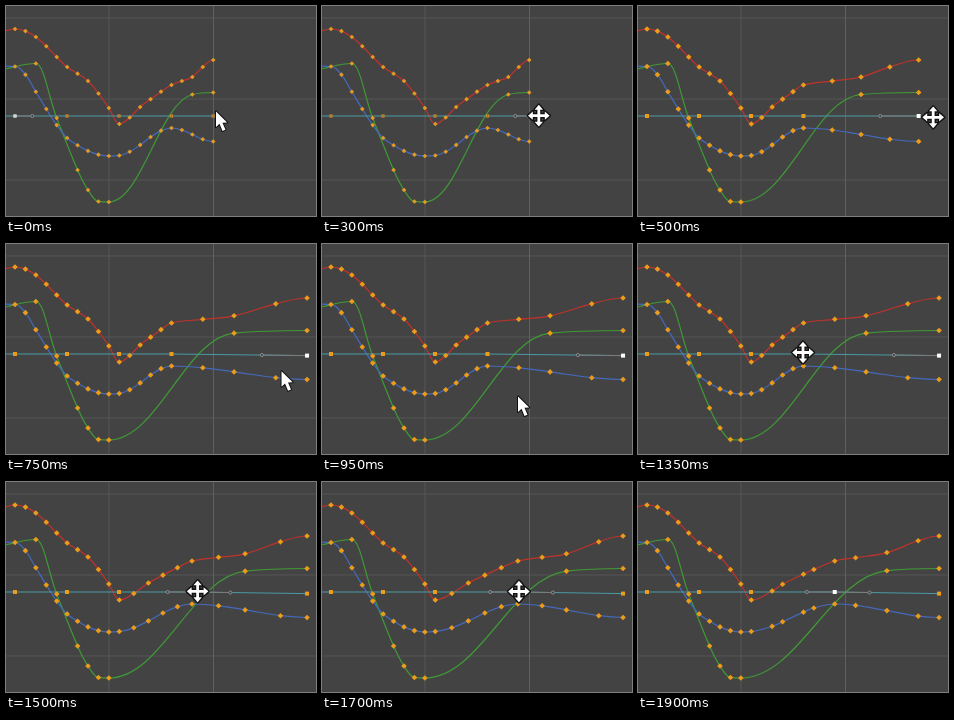
Write an HTML page with a canvas that moves like this. It is 310 px wide and 210 px high and loops after 2000 ms.

```html
<!DOCTYPE html>
<html lang="en">
<head>
<meta charset="utf-8">
<title>Animation curve retiming</title>
<style>
html, body { margin: 0; width: 100%; height: 100%; overflow: hidden; background: #434344; }
canvas { display: block; width: 310px; height: 210px; }
</style>
</head>
<body>
<canvas id="stage" width="310" height="210"></canvas>
<script>
const ctx = document.getElementById('stage').getContext('2d');
const LOOP = 2000, STEP = 50;
const DRAG_END = 300, SNAP_END = 700, DRAG_MID = 1350, SNAP_MID = 1850;
const HANDLE = 0.39;

const lerp = (a, b, p) => a + (b - a) * p;
const ramp = (t, a, b) => Math.min(1, Math.max(0, (t - a) / (b - a)));
const smooth = p => p * p * (3 - 2 * p);
const easeOut = (p, n) => 1 - (1 - p) ** n;
const px = frame => 9 + frame * 10.43;
const toFrame = x => (x - 9) / 10.43;

// Auto tangents: flat at extremes, handles never past a neighbour
function slopes(p) {
  return p.map(([x, y], i) => {
    if (!i || i === p.length - 1) return 0;
    const [x0, y0] = p[i - 1], [x1, y1] = p[i + 1];
    const a = (y - y0) / (x - x0), b = (y1 - y) / (x1 - x);
    if (a * b <= 0) return 0;
    const m = (y1 - y0) / (x1 - x0);
    return Math.sign(m) * Math.min(Math.abs(m), Math.abs(a) / HANDLE, Math.abs(b) / HANDLE);
  });
}

function valueAt(keys, x) {
  const i = keys.findIndex(k => k[0] >= x);
  if (i < 0) return keys[keys.length - 1][1];
  if (i === 0) return keys[0][1];
  const m = slopes(keys), [x0, y0] = keys[i - 1], [x1, y1] = keys[i];
  const d = x1 - x0, u = (x - x0) / d, v = 1 - u;
  return lerp(y0, y1, smooth(u)) + d * u * v * (v * m[i - 1] - u * m[i]);
}

// Fill in a key on every frame from a few anchors
function bake(anchors) {
  const keys = [anchors[0]];
  for (let k = 0; k <= 19; k++) keys.push([k, valueAt(anchors, k)]);
  return keys;
}

const curves = [
  { color: '#3f9a35', keys: [[-2, 64], [2, 57.5], [4, 112], [6, 164], [7, 184], [8, 195.5], [9, 196], [17, 88.5], [19, 86.5]] },
  { color: '#4469bc', keys: bake([[-2, 60], [0, 60.5], [3, 103], [5, 132], [9, 150], [10, 149.5], [15, 122], [16, 124], [19, 135.5]]) },
  { color: '#c0322a', keys: bake([[-2, 27], [0, 23], [2, 31], [5, 61], [7, 75], [9, 102], [10, 118], [12, 101], [15, 79], [17, 71], [19, 54]]) }
];

function getState(t) {
  return {
    end: t >= SNAP_END ? 28 : toFrame(lerp(207.2, 299, ramp(t, DRAG_END, 550))),
    mid: t >= SNAP_MID ? 18 : toFrame(lerp(165.5, 196.7, easeOut(ramp(t, DRAG_MID, SNAP_MID), 3))),
    endY: 110 + 1.6 * ramp(t, 500, 550)
  };
}

// Keys move to whole frames and stay on the curve
const snapKeys = keys => keys.map(([k]) => [Math.round(k), valueAt(keys, Math.round(k))]);

function stretchEnd(keys, end) {
  return keys.map(([k, y]) => [k > 15 ? lerp(15, end, (k - 15) / 4) : k, y]);
}

function shiftMid(keys, mid) {
  return keys.map(([k, y]) => {
    if (k <= 10) return [k, y];
    return [k <= 15 ? lerp(10, mid, (k - 10) / 5) : lerp(mid, 28, (k - 15) / 13), y];
  });
}

function retime(keys, t) {
  if (t < SNAP_END) return stretchEnd(keys, getState(t).end);
  const wide = snapKeys(stretchEnd(keys, getState(SNAP_END - STEP).end));
  if (t < SNAP_MID) return shiftMid(wide, getState(t).mid);
  return snapKeys(shiftMid(wide, getState(SNAP_MID - STEP).mid));
}

function drawCurve(p, color) {
  const m = slopes(p);
  ctx.beginPath();
  ctx.moveTo(...p[0]);
  for (let i = 1; i < p.length; i++) {
    const [x0, y0] = p[i - 1], [x1, y1] = p[i], d = (x1 - x0) * HANDLE;
    ctx.bezierCurveTo(x0 + d, y0 + m[i - 1] * d, x1 - d, y1 - m[i] * d, x1, y1);
  }
  ctx.strokeStyle = color;
  ctx.lineWidth = 1.2;
  ctx.stroke();
}

function poly(points) {
  ctx.beginPath();
  points.forEach(([x, y]) => ctx.lineTo(x, y));
  ctx.closePath();
}

function diamond(x, y, r, color) {
  poly([[x, y - r], [x + r, y], [x, y + r], [x - r, y]]);
  ctx.fillStyle = color;
  ctx.fill();
}

function line(x0, y0, x1, y1, color) {
  ctx.beginPath();
  ctx.moveTo(x0, y0);
  ctx.lineTo(x1, y1);
  ctx.strokeStyle = color;
  ctx.lineWidth = 1;
  ctx.stroke();
}

function drawGrid() {
  ctx.fillStyle = '#434344';
  ctx.fillRect(0, 0, 310, 210);
  for (let y = 12; y < 210; y += 81) line(0, y, 310, y, '#545454');
  line(103, 0, 103, 210, '#565656');
  line(207.5, 0, 207.5, 210, '#606060');
}

function drawTimeLine(t, s, bright) {
  const keys = [[9, 110], [61, 110], [113, 110], [px(s.mid), 110], [px(s.end), s.endY]];
  const chosen = t < 150 ? 0 : t < 1400 ? 4 : 3;
  const path = [[0, 110], ...keys];
  for (let i = 1; i < path.length; i++) line(...path[i - 1], ...path[i], '#4a9aa5');

  const [kx, ky] = keys[chosen];
  for (const side of [-1, 1]) {
    const near = keys[chosen + side];
    if (!near) continue;
    const hx = lerp(kx, near[0], 1 / 3), hy = lerp(ky, near[1], 1 / 3);
    line(kx, ky, hx, hy, '#7c7c7c');
    ctx.beginPath();
    ctx.arc(hx, hy, 1.6, 0, 7);
    ctx.fillStyle = '#434344';
    ctx.fill();
    ctx.strokeStyle = '#8c8c8c';
    ctx.stroke();
  }
  keys.forEach(([x, y], i) => {
    const r = bright ? 2 : 1.6;
    ctx.fillStyle = i === chosen ? '#ffffff' : bright ? '#eb9c1a' : '#c88b27';
    ctx.fillRect(x - r, y - r, 2 * r, 2 * r);
    if (!bright) {
      ctx.fillStyle = '#655538';
      ctx.fillRect(x - 0.5, y - 0.5, 1, 1);
    }
  });
}

function outlined(width) {
  ctx.lineJoin = 'round';
  ctx.strokeStyle = '#111111';
  ctx.lineWidth = width;
  ctx.stroke();
  ctx.fillStyle = '#ffffff';
  ctx.fill();
}

function drawArrow(x, y) {
  const shape = [[0, 0.5], [0, 16], [3.5, 12.8], [6.5, 20], [9.5, 18.7], [6.5, 11.8], [11.2, 11.5]];
  poly(shape.map(([a, b]) => [x + a, y + b]));
  outlined(2);
}

function drawMove(x, y) {
  const arm = [[-1.4, -1.4], [-1.4, -6], [-4.2, -6], [0, -10.8], [4.2, -6], [1.4, -6]];
  const shape = [];
  for (let q = 0; q < 4; q++) {
    const c = [1, 0, -1, 0][q], s = [0, 1, 0, -1][q];
    for (const [a, b] of arm) shape.push([x + a * c - b * s, y + a * s + b * c]);
  }
  poly(shape);
  outlined(2.8);
}

function drawCursor(t) {
  if (t >= 1900) return;
  if (t < 200) {
    const p = ramp(t, 0, 150);
    drawArrow(lerp(210, 208, p), lerp(105, 109, p));
  } else if (t < SNAP_END) {
    const p = smooth(ramp(t, 250, 550));
    drawMove(lerp(210, 302, p), lerp(109.5, 111.5, p));
  } else if (t < 1300) {
    const p = ramp(t, SNAP_END, 1200), q = 1 - p;
    drawArrow(q * q * 303 + 2 * p * q * 158 + p * p * 165,
      q * q * 112 + 2 * p * q * 194 + p * p * 108);
  } else {
    const p = easeOut(ramp(t, DRAG_MID, SNAP_MID), 5);
    drawMove(lerp(165, 197, p), lerp(108.5, 109.5, p));
  }
}

function draw(t) {
  const s = getState(t), bright = t >= 350;
  drawGrid();
  const paths = curves.map(c => retime(c.keys, t).map(([k, y]) => [px(k), y]));
  curves.forEach((c, i) => drawCurve(paths[i], c.color));
  drawTimeLine(t, s, bright);
  for (const [x, y] of paths.flat()) diamond(x, y, bright ? 2.8 : 2.3, bright ? '#eb9c1a' : '#e39b24');
  drawCursor(t);
}

const start = performance.now();
function tick() {
  const t = (performance.now() - start) % LOOP;
  draw(Math.floor(t / STEP) * STEP);
  requestAnimationFrame(tick);
}
tick();
</script>
</body>
</html>
```
